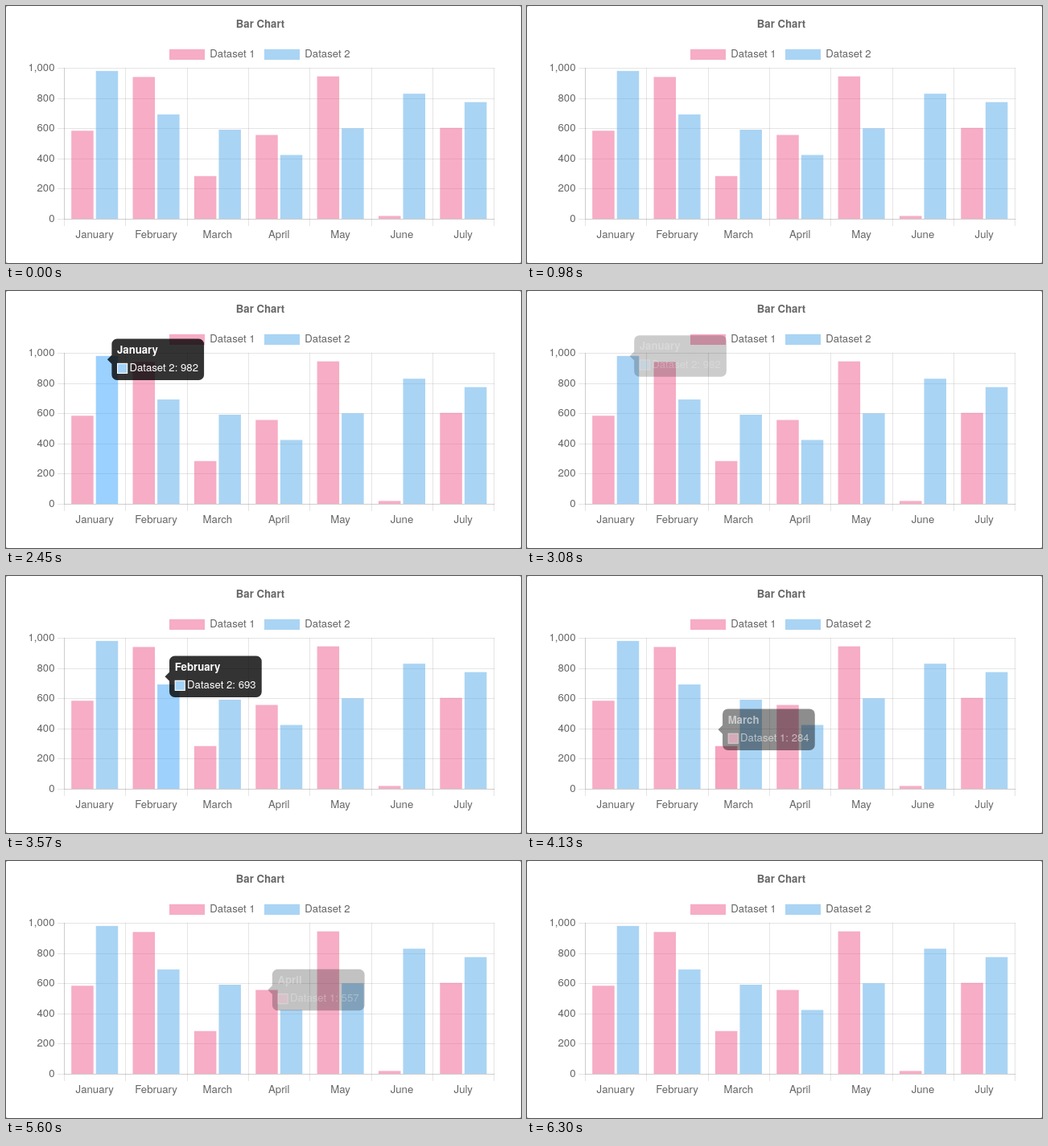
An HTML page with a canvas that plays this animation: 640x320 px, repeating every 6.93 s.

```html
<!DOCTYPE html>
<html lang="en">
<head>
<meta charset="utf-8">
<title>Bar Chart</title>
<style>
  html, body { margin: 0; width: 100%; height: 100%; overflow: hidden; background: #fff; }
  canvas { display: block; width: 640px; height: 320px; }
</style>
</head>
<body>
<canvas id="stage"></canvas>
<script>
const LOOP = 6930, STEP = 70, MOVE = 400, FADE = 200;
const U = 1.1, SIZE = 12 * U;
const LEFT = 72, BOTTOM = 265, CELL = 76.35, BAR = 27.5;
const months = ['January', 'February', 'March', 'April', 'May', 'June', 'July'];
const values = [
  [585, 942, 284, 557, 946, 19, 604],
  [982, 693, 592, 424, 601, 831, 775]
];
const base = [[237, 93, 139], [87, 169, 233]];
const hover = [[237, 65, 119], [55, 163, 255]];

// [time, month, dataset]; no month means the pointer is between bars
const events = [
  [1500, 0, 0], [2247, 0, 1], [2930], [3160, 1, 0], [3441, 1, 1], [3800],
  [4018, 2, 0], [4265, 2, 1], [5010], [5205, 3, 0], [5460]
];

const canvas = document.getElementById('stage');
const ctx = canvas.getContext('2d');
const dpr = window.devicePixelRatio || 1;
canvas.width = 640 * dpr;
canvas.height = 320 * dpr;

const clamp = v => Math.min(1, Math.max(0, v));
const easeOutQuart = p => 1 - (1 - clamp(p)) ** 4;
const fillOf = (d, heat) =>
  `rgba(${base[d].map((c, k) => c + (hover[d][k] - c) * heat)},.5)`;
const barLeft = (m, d) => LEFT + CELL * m + 9.2 + d * 30.54;
const barTop = (m, d) => BOTTOM - values[d][m] * 0.1875;

function stateAt(t) {
  const s = { x: 212, y: 179, alpha: 0, m: 0, d: 0, heat: [Array(7).fill(0), Array(7).fill(0)] };
  events.forEach(([start, m, d], i) => {
    if (t < start) return;
    const end = i + 1 < events.length ? events[i + 1][0] : LOOP;
    const dt = Math.min(t, end) - start, e = easeOutQuart(dt / MOVE);
    const shown = m !== undefined;
    s.alpha = clamp(s.alpha + (shown ? dt : -dt) / FADE);
    s.heat = s.heat.map((row, q) => row.map((h, p) => h + ((p === m && q === d) - h) * e));
    if (shown) {
      s.x += (barLeft(m, d) + BAR / 2 + 7 * U - s.x) * e;
      s.y += (barTop(m, d) - s.y) * e;
      s.m = m;
      s.d = d;
    }
  });
  return s;
}

function text(str, x, y, align = 'left', color = '#666', weight = '') {
  ctx.font = `${weight} ${SIZE}px "Helvetica Neue", Helvetica, Arial, "Liberation Sans", sans-serif`;
  ctx.textAlign = align;
  ctx.textBaseline = 'middle';
  ctx.fillStyle = color;
  ctx.fillText(str, x, y);
}

function rect(x, y, w, h, color) {
  ctx.fillStyle = color;
  ctx.fillRect(x, y, w, h);
}

function drawAxes() {
  const line = 'rgba(0,0,0,.1)';
  for (let i = 0; i <= 7; i++) {
    rect(Math.round(LEFT + CELL * i), 77, 1, 197, line);
    if (i < 7) text(months[i], LEFT + CELL * (i + 0.5), 285, 'center');
  }
  for (let i = 0; i <= 5; i++) {
    const y = BOTTOM - 37.5 * i;
    rect(64, Math.floor(y), 543, 1, line);
    text((200 * i).toLocaleString('en-US'), 60.5, y, 'right');
  }
  rect(LEFT, 77, 1, 188, line);
  rect(LEFT, BOTTOM, 535, 1, line);
}

function drawTooltip({ x, y, alpha, m, d }) {
  if (!alpha) return;
  const w = 114.7, h = 51.5, top = y - h / 2, pad = 6 * U, caret = 5 * U;
  ctx.globalAlpha = alpha;
  ctx.fillStyle = 'rgba(0,0,0,.8)';
  ctx.beginPath();
  ctx.roundRect(x, top, w, h, pad);
  ctx.moveTo(x, y - caret);
  ctx.lineTo(x, y + caret);
  ctx.lineTo(x - caret, y);
  // opposite winding would cut the caret, so it only touches the box edge
  ctx.fill();
  text(months[m], x + pad, top + 14.5, 'left', '#fff', 'bold');
  rect(x + pad, top + 30.3, SIZE, SIZE, '#fff');
  rect(x + pad + U, top + 30.3 + U, SIZE - 2 * U, SIZE - 2 * U, fillOf(d, 0.4));
  text(`Dataset ${d + 1}: ${values[d][m]}`, x + 22, top + 36.9, 'left', '#fff');
  ctx.globalAlpha = 1;
}

function draw(t) {
  const s = stateAt(t);
  ctx.setTransform(dpr, 0, 0, dpr, 0, 0);
  rect(0, 0, 640, 320, '#999');
  ctx.fillStyle = '#fff';
  ctx.beginPath();
  ctx.roundRect(0, 0, 640, 320, 2.5);
  ctx.fill();
  text('Bar Chart', 316, 23.5, 'center', '#666', 'bold');
  drawAxes();
  for (const d of [0, 1]) {
    rect(203 + 118 * d, 53.8, 44, SIZE, fillOf(d, 0));
    text(`Dataset ${d + 1}`, 253.3 + 118 * d, 60.7);
    months.forEach((_, m) => {
      const top = barTop(m, d);
      rect(barLeft(m, d), top, BAR, BOTTOM - top, fillOf(d, s.heat[d][m]));
    });
  }
  drawTooltip(s);
}

const began = performance.now();
function frame() {
  const t = (performance.now() - began) % LOOP;
  draw(t - t % STEP);
  requestAnimationFrame(frame);
}
frame();
</script>
</body>
</html>
```
